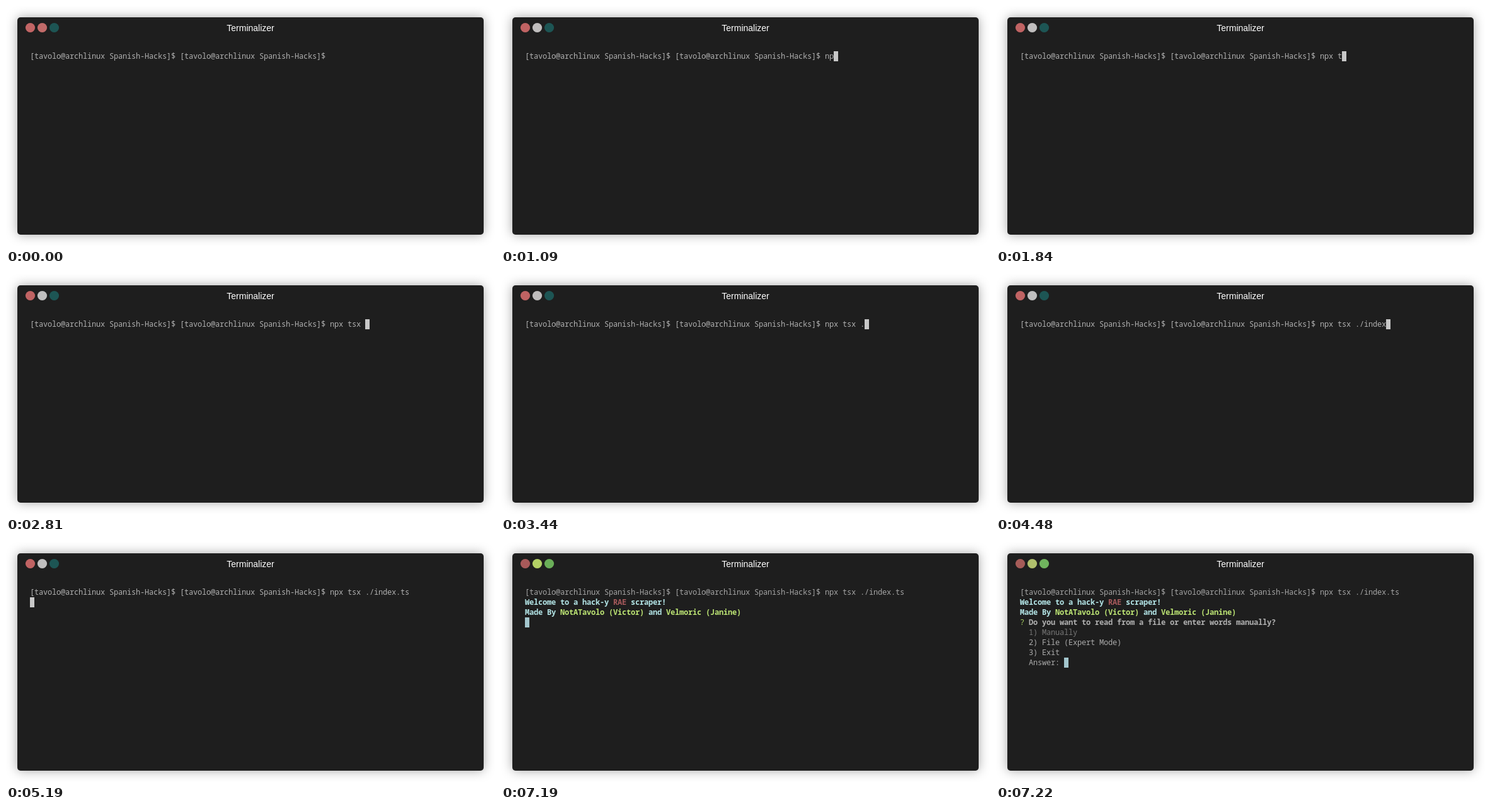
An HTML page that plays this animation: 776x382 px, repeating every 8000 ms.

```html
<!DOCTYPE html>
<html lang="en">
<head>
<meta charset="utf-8">
<title>Terminalizer</title>
<style>
html, body { margin: 0; width: 100%; height: 100%; overflow: hidden; background: #fff; }
#window { position: absolute; left: 18px; top: 18px; width: 740px; height: 346px;
  border-radius: 5px; background: #1e1e1e; box-shadow: 0 0 18px rgba(0, 0, 0, .35); }
svg { position: absolute; left: 0; top: 0; }
#title { font: 14px "Liberation Sans", Arial, sans-serif; fill: #fff; text-anchor: middle; }
#lines text { font: 12px "Noto Sans Mono", "DejaVu Sans Mono", monospace; white-space: pre; }
#lines .bold { font-weight: 700; }
</style>
</head>
<body>
<div id="window"></div>
<svg width="776" height="382" viewBox="0 0 776 382">
  <circle cx="38.5" cy="34.5" r="7.6"/>
  <circle cx="57.5" cy="34.5" r="7.6"/>
  <circle cx="76.5" cy="34.5" r="7.6"/>
  <text id="title" x="388" y="40">Terminalizer</text>
  <rect id="cursor" width="7" height="16"/>
  <g id="lines"></g>
</svg>
<script>
const LOOP = 8000, CELL = 7, ROW = 16, LEFT = 38, TOP = 72;
const PROMPT = '[tavolo@archlinux Spanish-Hacks]$ '.repeat(2);
const COMMAND = 'npx tsx ./index.ts';
const KEY_TIMES = [500, 1090, 1200, 1400, 1840, 2140, 2280, 2810, 3440, 3520,
  3780, 3900, 4190, 4320, 4480, 4620, 4960, 5020];
const ENTER = 5190, WELCOME = 7190, MENU = 7220;
const CYAN = '#b4e6e8', LIME = '#bde574', RED = '#a85a5c', GREY = '#aaaaaa';

// Each run: row, column, text, colour, bold
const welcome = [
  [1, 0, 'Welcome to a hack-y ', CYAN, true],
  [1, 20, 'RAE', RED, true],
  [1, 24, 'scraper!', CYAN, true],
  [2, 0, 'Made By', CYAN, true],
  [2, 8, 'NotATavolo (Victor)', LIME, true],
  [2, 28, 'and', CYAN, true],
  [2, 32, 'Velmoric (Janine)', LIME, true]
];
const menu = [
  [3, 0, '?', '#a4cc62', false],
  [3, 2, 'Do you want to read from a file or enter words manually?', '#b0b0b0', true],
  [4, 2, '1) Manually', '#777777', false],
  [5, 2, '2) File (Expert Mode)', GREY, false],
  [6, 2, '3) Exit', GREY, false],
  [7, 2, 'Answer:', GREY, false]
];

const lines = document.getElementById('lines');
const cursor = document.getElementById('cursor');
const buttons = document.querySelectorAll('circle');

function addRun([row, col, str, fill, bold]) {
  const el = document.createElementNS('http://www.w3.org/2000/svg', 'text');
  el.setAttribute('x', [...str].map((_, i) => LEFT + CELL * (col + i)).join(' '));
  el.setAttribute('y', TOP + 12 + ROW * row);
  el.setAttribute('fill', fill);
  if (bold) el.setAttribute('class', 'bold');
  el.textContent = str;
  lines.append(el);
}

function buttonColors(t) {
  if (t < KEY_TIMES[0]) return ['#c26565', '#c26b69', '#1d5453'];
  if (t < WELCOME) return ['#c06363', '#c0bebe', '#1d5554'];
  if (t < MENU) return ['#a85a5a', '#b3d165', '#6aae58'];
  return ['#a65c58', '#b0bf6c', '#70b45e'];
}

let shown = '';
function draw() {
  const t = performance.now() % LOOP;
  const typed = KEY_TIMES.filter(k => k <= t).length;
  const stage = [ENTER, WELCOME, MENU].filter(s => s <= t).length;
  const key = typed + ':' + stage;
  if (key !== shown) {
    shown = key;
    const runs = [[0, 0, PROMPT + COMMAND.slice(0, typed), stage > 1 ? '#a4a4a4' : '#b0b0b0', false]];
    if (stage > 1) runs.push(...welcome);
    if (stage > 2) runs.push(...menu);
    lines.replaceChildren();
    runs.forEach(addRun);

    const [row, col] = [[0, PROMPT.length + typed], [1, 0], [3, 0], [7, 10]][stage];
    cursor.setAttribute('x', LEFT + CELL * col);
    cursor.setAttribute('y', TOP + ROW * row);
    cursor.setAttribute('fill', stage > 1 ? '#a3c6cd' : '#c8c8c8');
    cursor.setAttribute('visibility', typed ? 'visible' : 'hidden');

    const colors = buttonColors(t);
    buttons.forEach((b, i) => b.setAttribute('fill', colors[i]));
  }
  requestAnimationFrame(draw);
}
draw();
</script>
</body>
</html>
```
